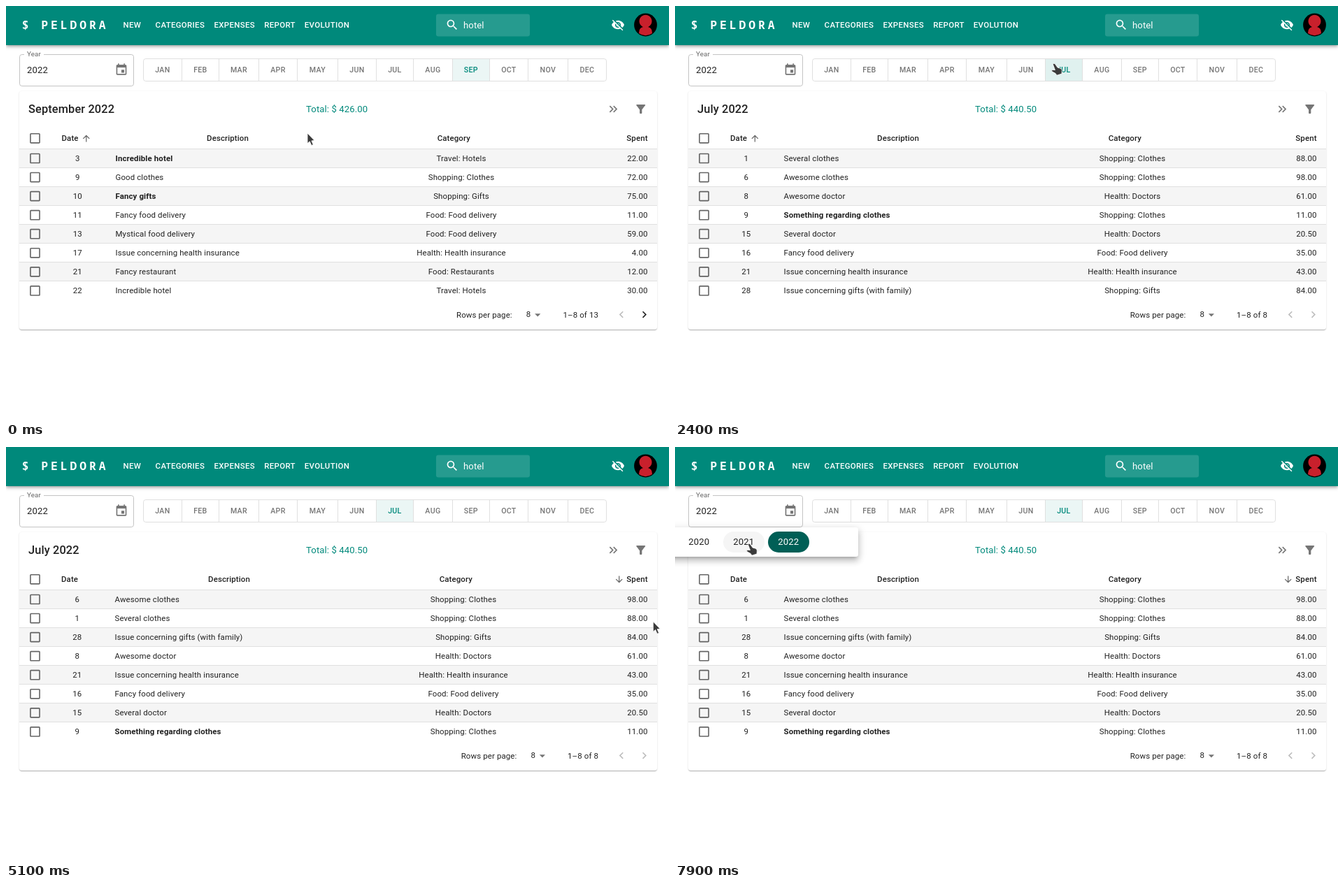
These frames come from a looping animation (948x591 px, 8 s). An HTML page:

```html
<!DOCTYPE html>
<html lang="en">
<head>
<meta charset="utf-8">
<title>Monthly expenses</title>
<style>
  html, body { margin: 0; width: 100%; height: 100%; overflow: hidden; background: #fff; }
  body { position: relative; }
  body > * { position: absolute; }
  #card {
    left: 19px; top: 122px; width: 912px; height: 341px; border-radius: 3.3px; background: #fff;
    box-shadow: 0 1.6px .8px -.8px rgba(0,0,0,.2), 0 .8px .8px rgba(0,0,0,.14), 0 .8px 2.5px rgba(0,0,0,.12);
  }
  #bar {
    left: 0; top: 0; width: 948px; height: 56px; background: #00897b;
    box-shadow: 0 1.6px 3.3px -.8px rgba(0,0,0,.2), 0 3.3px 4px rgba(0,0,0,.14), 0 .8px 8px rgba(0,0,0,.12);
  }
  #popup {
    left: -10px; top: 115px; width: 272px; height: 42px; border-radius: 3.3px; background: #fff;
    transform-origin: 50% 0;
    box-shadow: 0 4px 4px -2.5px rgba(0,0,0,.2), 0 6.5px 8px .8px rgba(0,0,0,.14), 0 2.5px 11.5px 1.6px rgba(0,0,0,.12);
  }
  svg { display: block; left: 0; top: 0; }
  text { font: 11.45px Roboto, sans-serif; letter-spacing: .0107em; fill: rgba(0,0,0,.87); white-space: pre; }
  .head { font-weight: 500; }
  .bold { font-weight: 700; }
  .title { font-size: 16.36px; font-weight: 500; letter-spacing: .0075em; }
  .big { font-size: 13.09px; letter-spacing: .0094em; }
  .total { fill: #00897b; }
  .label { font-size: 9.8px; fill: rgba(0,0,0,.6); }
  .nav { font-weight: 500; letter-spacing: .0286em; }
  .white { fill: #fff; }
  .brand { font: 700 16.36px "Noto Sans Mono", monospace; letter-spacing: 3.93px; }
  .month { font-size: 10.64px; font-weight: 500; letter-spacing: .0286em; fill: rgba(0,0,0,.54); }
  .month.on { fill: #00897b; }
</style>
</head>
<body>
<div id="card"></div>
<div id="bar"></div>
<svg width="948" height="591"><g id="fixed"></g><g id="live"></g></svg>
<div id="popup"><svg id="years" width="272" height="42" viewBox="-10 115 272 42"></svg></div>
<svg width="948" height="591"><path id="pointer" fill="#3b3b3b" stroke="#fff" stroke-width=".8" stroke-linejoin="round"/></svg>
<script>
const LOOP = 8000, STEP = 100, ROWS = 8, PITCH = 27.06;
const INK = 'rgba(0,0,0,.87)', GREY = 'rgba(0,0,0,.54)', FAINT = 'rgba(0,0,0,.26)', LINE = '#e0e0e0', TEAL = '#00897b';
const $ = id => document.getElementById(id);
const clamp = v => Math.max(0, Math.min(1, v));
const smooth = p => p * p * (3 - 2 * p);

const ICONS = {
  search: 'M15.5 14h-.79l-.28-.27C15.41 12.59 16 11.11 16 9.5 16 5.91 13.09 3 9.5 3S3 5.91 3 9.5 5.91 16 9.5 16c1.61 0 3.09-.59 4.23-1.57l.27.28v.79l5 4.99L20.49 19l-4.99-5zm-6 0C7.01 14 5 11.99 5 9.5S7.01 5 9.5 5 14 7.01 14 9.5 11.99 14 9.5 14z',
  hidden: 'M12 7c2.76 0 5 2.24 5 5 0 .65-.13 1.26-.36 1.83l2.92 2.92c1.51-1.26 2.7-2.89 3.43-4.75-1.73-4.39-6-7.5-11-7.5-1.4 0-2.74.25-3.98.7l2.16 2.16C10.74 7.13 11.35 7 12 7zM2 4.27l2.74 2.74C3.08 8.3 1.78 10.02 1 12c1.73 4.39 6 7.5 11 7.5 1.55 0 3.03-.3 4.38-.84L19.73 22 21 20.73 3.27 3 2 4.27zM7.53 9.8l1.55 1.55c-.05.21-.08.43-.08.65 0 1.66 1.34 3 3 3 .22 0 .44-.03.65-.08l1.55 1.55c-.67.33-1.41.53-2.2.53-2.76 0-5-2.24-5-5 0-.79.2-1.53.53-2.2zm4.31-.78l3.15 3.15.02-.16c0-1.66-1.34-3-3-3l-.17.01z',
  calendar: 'M17 12h-5v5h5v-5zM16 1v2H8V1H6v2H5c-1.11 0-1.99.9-1.99 2L3 19c0 1.1.89 2 2 2h14c1.1 0 2-.9 2-2V5c0-1.1-.9-2-2-2h-1V1h-2zm3 18H5V8h14v11z',
  more: 'M6.41 6L5 7.41 9.58 12 5 16.59 6.41 18l6-6zM13 6l-1.41 1.41L16.17 12l-4.58 4.59L13 18l6-6z',
  filter: 'M4.25 5.61C6.27 8.2 10 13 10 13v6c0 .55.45 1 1 1h2c.55 0 1-.45 1-1v-6s3.72-4.8 5.74-7.39c.51-.66.04-1.61-.79-1.61H5.04c-.83 0-1.3.95-.79 1.61z',
  sort: 'M4 12l1.41 1.41L11 7.83V20h2V7.83l5.58 5.59L20 12l-8-8-8 8z',
  box: 'M19 5v14H5V5h14m0-2H5c-1.1 0-2 .9-2 2v14c0 1.1.9 2 2 2h14c1.1 0 2-.9 2-2V5c0-1.1-.9-2-2-2z',
  next: 'M8.59 16.59l4.58-4.59-4.58-4.59L10 6l6 6-6 6z',
  prev: 'M15.41 16.59L10.83 12l4.58-4.59L14 6l-6 6 6 6z',
  drop: 'M7 10l5 5 5-5z'
};
const POINTERS = {
  arrow: 'M0 0V14.6L3.3 11.8 5.8 17.5 8.3 16.4 5.9 10.9 10 10.4Z',
  hand: 'M-.6 1.6Q.4-.6 2.4.8L6 6 10.2 7.2Q12.4 8 12.3 10.5L12 15 4.8 17.2 3.2 14.6-1.9 11.8Q-3.4 9.6-1 9.3L2.4 9.6Z'
};

const text = (x, y, str, cls = '', anchor = 'start') =>
  `<text x="${x}" y="${y}" class="${cls}" text-anchor="${anchor}">${str}</text>`;
const rect = (x, y, w, h, fill, extra = '') =>
  `<rect x="${x}" y="${y}" width="${w}" height="${h}" fill="${fill}" ${extra}/>`;
const icon = (name, cx, cy, fill = GREY, size = 19.64, turn = 0, opacity = 1) =>
  `<path d="${ICONS[name]}" fill="${fill}" opacity="${opacity}" transform="translate(${cx} ${cy}) rotate(${turn}) scale(${size / 24}) translate(-12 -12)"/>`;

const MONTHS = 'JAN FEB MAR APR MAY JUN JUL AUG SEP OCT NOV DEC'.split(' ');
const EDGES = [196, 251, 304, 361, 416, 474, 529, 582, 638, 691, 746, 803, 858];

// Each row: day, description, category, spent; a leading * marks bold.
const parse = list => list.trim().split('\n').map(line => {
  const [day, name, category, spent] = line.trim().split('|');
  return { day, name: name.replace('*', ''), bold: name[0] === '*', category, spent: +spent };
});
const SEPTEMBER = {
  title: 'September 2022', total: '426.00', dateX: 79.5, nameX: 156.5, nameHead: 317, categoryX: 651, count: 13,
  rows: parse(`3|*Incredible hotel|Travel: Hotels|22
    9|Good clothes|Shopping: Clothes|72
    10|*Fancy gifts|Shopping: Gifts|75
    11|Fancy food delivery|Food: Food delivery|11
    13|Mystical food delivery|Food: Food delivery|59
    17|Issue concerning health insurance|Health: Health insurance|4
    21|Fancy restaurant|Food: Restaurants|12
    22|Incredible hotel|Travel: Hotels|30`)
};
const AUGUST = {
  title: 'August 2022', total: '614.00', dateX: 85.5, nameX: 169, nameHead: 319, categoryX: 636, count: 13,
  rows: parse(`2|A very good food delivery|Food: Food delivery|1
    3|*Several gifts|Shopping: Gifts|50
    7|*Good hotel|Travel: Hotels|45
    10|Disappointing clothes|Shopping: Clothes|94
    10|Fancy gifts|Shopping: Gifts|9
    12|That thing with travel ticket|Travel: Tickets|36
    13|Awesome gifts|Shopping: Gifts|59
    15|That thing with clothes|Shopping: Clothes|73`)
};
const JULY = {
  title: 'July 2022', total: '440.50', dateX: 79, nameX: 155.5, nameHead: 319, categoryX: 654, count: 8,
  rows: parse(`1|Several clothes|Shopping: Clothes|88
    6|Awesome clothes|Shopping: Clothes|98
    8|Awesome doctor|Health: Doctors|61
    9|*Something regarding clothes|Shopping: Clothes|11
    15|Several doctor|Health: Doctors|20.5
    16|Fancy food delivery|Food: Food delivery|35
    21|Issue concerning health insurance|Health: Health insurance|43
    28|Issue concerning gifts (with family)|Shopping: Gifts|84`)
};

// Clicks
const AUG_AT = 1100, JUL_AT = 2000, SORT_UP = 4000, SORT_DOWN = 4600, OPEN_AT = 7200;

// Pointer moves: start, end, target, optional curve control
const ORIGIN = [431, 182];
const MOVES = [
  [100, 800, 605, 83],
  [1200, 1700, 541, 82],
  [2500, 3400, 924, 173, 960, 830],
  [3400, 3800, 895, 189],
  [4900, 5500, 917, 459, 970, 300],
  [5700, 6200, 258, 102],
  [6200, 6600, 163, 90],
  [7200, 7700, 105, 138]
];

function pointerAt(t) {
  let [x, y] = ORIGIN;
  for (const [start, end, tx, ty, cx = (x + tx) / 2, cy = (y + ty) / 2] of MOVES) {
    if (t <= start) break;
    const u = smooth(clamp((t - start) / (end - start)));
    const bend = (a, c, b) => (1 - u) ** 2 * a + 2 * u * (1 - u) * c + u * u * b;
    [x, y] = [bend(x, cx, tx), bend(y, cy, ty)];
  }
  return [x, y];
}
const inside = ([x, y], [l, t, r, b]) => x >= l && x < r && y >= t && y < b;
const ZONES = {
  months: [196, 75, 858, 107], spent: [870, 180, 918, 199], calendar: [149, 75, 181, 107],
  field: [19, 69, 183, 115], year: [69, 121, 128, 151]
};

function drawFixed() {
  const nav = [[167.6, 'NEW'], [213.6, 'CATEGORIES'], [297.4, 'EXPENSES'], [369.3, 'REPORT'], [426.8, 'EVOLUTION']];
  let out = text(22.7, 33, '$ PELDORA', 'brand white');
  out += nav.map(([x, label]) => text(x, 31, label, 'nav white')).join('');
  out += rect(615, 11.5, 134, 32, 'rgba(255,255,255,.15)', 'rx="3.3"');
  out += icon('search', 638, 27, '#fff') + text(654, 32, 'hotel', 'big white');
  out += icon('hidden', 875, 27, '#fff');
  out += '<circle cx="914.5" cy="27" r="16.4"/><path d="M905 39Q905 31 911 30A9 9 0 1 1 918 30Q924 31 924 39A16 16 0 0 1 905 39Z" fill="#c8202c"/>';
  out += icon('more', 868.5, 147.5) + icon('filter', 907.7, 147.5);
  for (let i = 0; i < ROWS; i++) {
    const top = 204.5 + i * PITCH;
    if (i % 2 === 0) out += rect(19, top, 912, PITCH, '#f5f5f5');
    out += rect(19, Math.round(top - .5), 912, 1, LINE);
    out += icon('box', 41.5, 218 + i * PITCH, 'rgba(0,0,0,.6)');
  }
  $('fixed').innerHTML = out + icon('box', 41.5, 189.3, 'rgba(0,0,0,.6)');
}

function yearField(hot) {
  const border = inside(hot, ZONES.field) ? INK : '#c4c4c4';
  let out = rect(19.5, 69.5, 163, 45, 'none', `rx="3.3" stroke="${border}"`) + rect(26, 68, 28, 3, '#fff');
  out += text(30, 72.3, 'Year', 'label') + text(30, 96, '2022', 'big');
  if (inside(hot, ZONES.calendar)) out += '<circle cx="165" cy="91" r="16.4" fill="rgba(0,0,0,.04)"/>';
  return out + icon('calendar', 165, 91.3);
}

function monthBar(t, hot) {
  const chosen = t < AUG_AT ? 8 : t < JUL_AT ? 7 : 6;
  let out = '';
  MONTHS.forEach((name, i) => {
    const left = EDGES[i], right = EDGES[i + 1], on = i === chosen;
    const hover = inside(hot, [left, 75, right, 107]);
    if (on) out += rect(left, 76, right - left, 31, TEAL, `opacity="${hover ? .12 : .08}"`);
    else if (hover) out += rect(left, 76, right - left, 31, '#f5f5f5');
    if (i) out += rect(left, 76, 1, 31, LINE);
    out += text((left + right) / 2 + .4, 94.7, name, on ? 'month on' : 'month', 'middle');
  });
  for (const [at, index] of [[AUG_AT, 7], [JUL_AT, 6]]) {
    const p = (t - at + STEP) / 500;
    if (p <= 0 || p >= 1) continue;
    const [x, y] = pointerAt(at), left = EDGES[index];
    out += `<clipPath id="ripple">${rect(left, 76, EDGES[index + 1] - left, 31, '#000')}</clipPath>`;
    out += `<circle cx="${x}" cy="${y}" r="${42 * smooth(p)}" fill="${TEAL}" opacity="${.28 * (1 - p)}" clip-path="url(#ripple)"/>`;
  }
  return out + rect(196.5, 75.5, 662, 32, 'none', `rx="3.3" stroke="${LINE}"`);
}

function table(t, hot) {
  const data = t < AUG_AT + STEP ? SEPTEMBER : t < JUL_AT + STEP ? AUGUST : JULY;
  const { dateX, nameX, categoryX } = data;
  const sign = t >= SORT_DOWN ? -1 : 1;
  const rows = t < SORT_UP ? data.rows : [...data.rows].sort((a, b) => sign * (a.spent - b.spent));
  const tone = 'rgba(0,0,0,.6)';

  let out = text(32, 153, data.title, 'title') + text(429, 151.7, `Total: $ ${data.total}`, 'big total');
  out += text(dateX, 193.4, 'Date', 'head') + text(data.nameHead, 193.4, 'Description', 'head', 'middle');
  out += text(categoryX - 10.7, 193.4, 'Category', 'head', 'middle') + text(917.6, 193.4, 'Spent', 'head', 'end');
  out += icon('sort', dateX + 35.3, 189.5, tone, 14.73, 0, 1 - clamp((t - SORT_UP + STEP) / 250));
  const spentOpacity = t >= SORT_UP ? 1 : inside(hot, ZONES.spent) ? .5 : 0;
  out += icon('sort', 876.7, 189.5, tone, 14.73, 180 * clamp((t - SORT_DOWN + STEP) / 250), spentOpacity);

  rows.forEach((row, i) => {
    const y = 222 + i * PITCH;
    out += text(dateX + 22.8, y, row.day, '', 'middle') + text(nameX, y, row.name, row.bold ? 'bold' : '');
    out += text(categoryX, y, row.category, '', 'middle') + text(917.6, y, row.spent.toFixed(2), '', 'end');
  });

  const shift = data.count > ROWS ? 0 : 6.7;
  out += text(644 + shift, 445.7, 'Rows per page:') + text(743.7 + shift, 445.2, ROWS);
  out += icon('drop', 760.2 + shift, 442) + text(847, 445.7, `1–8 of ${data.count}`, '', 'end');
  return out + icon('prev', 880, 441.6, FAINT) + icon('next', 912.7, 441.6, shift ? FAINT : INK);
}

function popup(t, hot) {
  const p = clamp((t - OPEN_AT + STEP) / 300), grow = 1 - (1 - p) ** 3;
  const style = $('popup').style;
  style.opacity = t < OPEN_AT ? 0 : p;
  style.transform = `scale(${.75 + .25 * grow}, ${.5625 + .4375 * grow})`;
  const pill = (x, fill) => rect(x, 121, 59, 30, fill, 'rx="15"');
  $('years').innerHTML = (inside(hot, ZONES.year) ? pill(69, '#f5f5f5') : '') + pill(133, '#005f56') +
    text(34.2, 140, '2020', 'big', 'middle') + text(98.2, 140, '2021', 'big', 'middle') +
    text(162.3, 140, '2022', 'big white', 'middle');
}

function render(t) {
  const at = pointerAt(t), hot = pointerAt(t - STEP);
  $('live').innerHTML = yearField(hot) + monthBar(t, hot) + table(t, hot);
  popup(t, hot);
  const { months, spent, calendar, year } = ZONES;
  const zones = t >= OPEN_AT ? [months, spent, calendar, year] : [months, spent, calendar];
  $('pointer').setAttribute('d', POINTERS[zones.some(zone => inside(at, zone)) ? 'hand' : 'arrow']);
  $('pointer').setAttribute('transform', `translate(${at[0]} ${at[1]})`);
}

const begin = performance.now();
let shown = -1;
function tick() {
  const t = Math.floor((performance.now() - begin) % LOOP / STEP) * STEP;
  if (t !== shown) render(shown = t);
  requestAnimationFrame(tick);
}
drawFixed();
tick();
</script>
</body>
</html>
```
